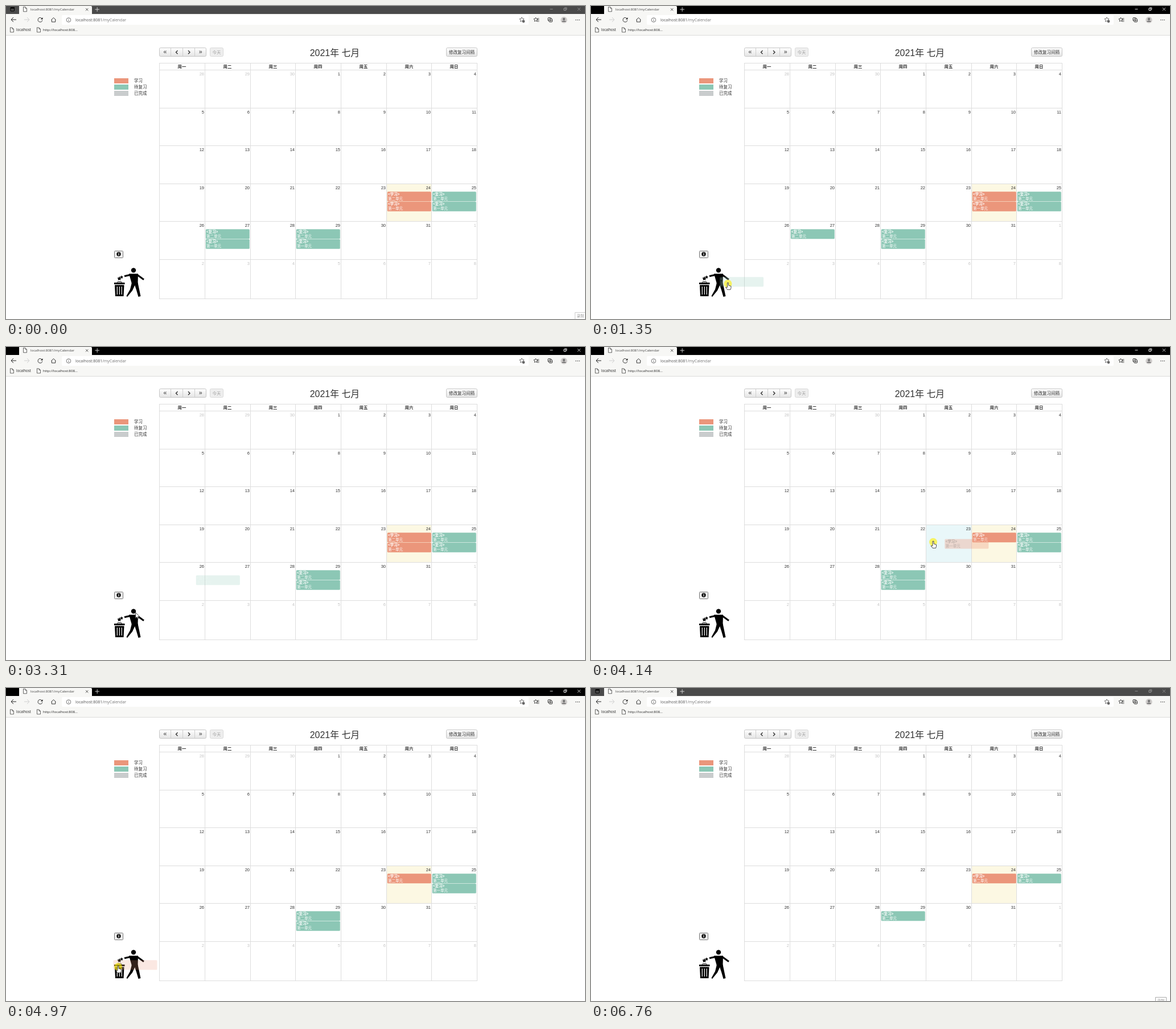
These frames come from a looping animation (1017x550 px, 6.82 s). An HTML page with a canvas:

```html
<!DOCTYPE html>
<html lang="zh-CN">
<head>
<meta charset="utf-8">
<title>Calendar</title>
<style>
html, body { margin: 0; width: 100%; height: 100%; overflow: hidden; background: #fff; }
canvas { display: block; }
</style>
</head>
<body>
<canvas id="stage" width="1017" height="550"></canvas>
<script>
const ctx = document.getElementById('stage').getContext('2d');
const LOOP = 6820;
const SANS = '"Liberation Sans", "Noto Sans CJK SC", "Noto Sans CJK JP", sans-serif';
const UI = '"Open Sans", "Noto Sans", sans-serif';
const RED = '#eb967b', GREEN = '#8cc7b5', GREY = '#c9cccd';
const DAY_ONE = 2; // index of the cell before the first of the month
const STUDY_DAY = 24;
const REVIEW_AFTER = [1, 3, 5];
const REFETCH = 5800;

const colX = i => Math.floor(269.9 + 79.62 * i);
const rowY = i => i < 6 ? Math.round(112.45 + 66.5 * i) : 514;

// Each pointer move is an eased curve: start, end, bend, destination
const ENTRY = { x: 1003, y: 541 };
const MOVES = [
  { from: 70, to: 740, bend: { x: 500, y: 470 }, dest: { x: 377, y: 418 } },
  { from: 800, to: 1496, bend: { x: 297, y: 476 }, dest: { x: 224, y: 492 } },
  { from: 1770, to: 2380, bend: { x: 300, y: 445 }, dest: { x: 368, y: 402 } },
  { from: 2380, to: 3050, bend: { x: 240, y: 494 }, dest: { x: 197, y: 492 } },
  { from: 3190, to: 3850, bend: { x: 363, y: 341 }, dest: { x: 680, y: 352 } },
  { from: 3930, to: 4980, bend: { x: 288, y: 295 }, dest: { x: 197, y: 490 } },
  { from: 5200, to: 6100, bend: { x: 300, y: 450 }, dest: { x: 934, y: 529 } }
];

const DRAGS = [
  { press: 800, drop: 1550, revert: 0, day: 27, unit: '一' },
  { press: 2380, drop: 3120, revert: 240, day: 27, unit: '二' },
  { press: 3930, drop: 5150, revert: 240, day: STUDY_DAY, unit: '一' }
];
const LIFT = 60;

function rect(x, y, w, h, fill) {
  ctx.fillStyle = fill;
  ctx.fillRect(x, y, w, h);
}

function box(x, y, w, h, r, fill, stroke) {
  ctx.beginPath();
  ctx.roundRect(x, y, w, h, r);
  if (fill) { ctx.fillStyle = fill; ctx.fill(); }
  if (stroke) { ctx.strokeStyle = stroke; ctx.lineWidth = 1; ctx.stroke(); }
}

function trace(pts) {
  ctx.beginPath();
  for (let i = 0; i < pts.length; i += 2) ctx.lineTo(pts[i], pts[i + 1]);
}

function line(color, width, ...pts) {
  trace(pts);
  ctx.strokeStyle = color;
  ctx.lineWidth = width;
  ctx.stroke();
}

function poly(fill, ...pts) {
  trace(pts);
  ctx.closePath();
  ctx.fillStyle = fill;
  ctx.fill();
}

function disc(x, y, r, fill) {
  ctx.beginPath();
  ctx.arc(x, y, r, 0, 7);
  ctx.fillStyle = fill;
  ctx.fill();
}

function ring(x, y, r, color, from = 0, to = 7) {
  ctx.beginPath();
  ctx.arc(x, y, r, from, to);
  ctx.strokeStyle = color;
  ctx.lineWidth = 0.9;
  ctx.stroke();
}

// Text centred vertically on y
function text(s, x, y, size, color, align = 'left', family = SANS, weight = '') {
  ctx.font = `${weight} ${size}px ${family}`;
  ctx.textAlign = align;
  ctx.fillStyle = color;
  ctx.fillText(s, x, y + size * 0.36);
}

function star(x, y, r, color, fill) {
  ctx.beginPath();
  for (let i = 0; i < 10; i++) {
    const a = i * Math.PI / 5 - Math.PI / 2, d = i % 2 ? r * 0.5 : r;
    ctx.lineTo(x + d * Math.cos(a), y + d * Math.sin(a));
  }
  ctx.closePath();
  ctx.strokeStyle = ctx.fillStyle = color;
  ctx.lineWidth = 0.8;
  fill ? ctx.fill() : ctx.stroke();
}

function page(x, y) {
  line('#444', 0.8, x, y, x + 3.5, y, x + 6, y + 2.5, x + 6, y + 8, x, y + 8, x, y - 0.4);
  line('#444', 0.7, x + 3.5, y, x + 3.5, y + 2.5, x + 6, y + 2.5);
}

function cross(x, y, r, color) {
  line(color, 0.8, x - r, y - r, x + r, y + r);
  line(color, 0.8, x + r, y - r, x - r, y + r);
}

function plus(x, y, r, color) {
  line(color, 0.9, x - r, y, x + r, y);
  line(color, 0.9, x, y - r, x, y + r);
}

function drawTabs(active) {
  const control = active ? '#fff' : '#999';
  rect(0, 0, 1017, 14, active ? '#000' : '#4a4a4a');
  box(8, 2.5, 6.5, 6.5, 1, null, '#000');
  rect(8, 2, 7, 2.5, '#000');
  rect(0, 14, 1017, 37, '#f7f7f5');
  box(23, 0, 128, 16, [0, 2, 0, 0], '#f7f7f5');
  page(30.5, 1.8);
  text('localhost:8081/myCalendar', 43, 6, 6.05, '#444', 'left', UI);
  cross(142.2, 6.2, 2.2, '#333');
  plus(160.2, 6, 3.8, '#ddd');
  line(control, 0.8, 955.5, 5.5, 960.5, 5.5);
  box(980, 4, 3.6, 3.6, 0, null, control);
  line(control, 0.7, 981.2, 2.8, 985, 2.8, 985, 6.5);
  cross(1006.5, 5.5, 2.5, control);
}

function drawAddressBar() {
  for (const [x, d, color] of [[9, 1, '#222'], [41, -1, '#d0d0d0']]) {
    line(color, 1, x, 24, x + 9 * d, 24);
    line(color, 1, x + 4 * d, 20, x, 24, x + 4 * d, 28);
  }
  ring(60, 24.3, 3.8, '#222', 0.2, 5.6);
  poly('#222', 64.5, 20, 64.5, 23.5, 61, 23.5);
  line('#222', 0.9, 79.5, 24.3, 83.5, 20.5, 87.5, 24.3);
  line('#222', 0.9, 80.3, 24, 80.3, 28, 86.7, 28, 86.7, 24);

  box(98, 16, 820, 17, 2, '#fff');
  ring(110, 24.5, 3.8, '#666');
  rect(109.6, 23.8, 0.9, 2.9, '#666');
  rect(109.6, 22.2, 0.9, 0.9, '#666');
  text('localhost:8081', 122, 24.3, 7, '#555', 'left', UI);
  const host = ctx.measureText('localhost:8081').width;
  text('/myCalendar', 122 + host, 24.3, 7, '#777', 'left', UI);

  star(906, 24, 4.3, '#555');
  disc(909, 27, 2.4, '#666');
  star(930.5, 24, 3.8, '#222');
  for (const y of [22, 24.5, 27]) line('#222', 0.8, 933, y, 936.5, y);
  box(952, 20.5, 5.5, 5.5, 1, null, '#333');
  box(954, 22.5, 5.5, 5.5, 1, '#f7f7f5', '#333');
  plus(956.7, 25.2, 1.8, '#333');
  disc(980, 24.5, 5.7, '#cfcccb');
  disc(980, 23, 2.2, '#777');
  ctx.beginPath();
  ctx.ellipse(980, 28, 3.6, 2.3, 0, Math.PI, 0);
  ctx.fill();
  for (const x of [1001, 1004, 1007]) disc(x, 24.5, 0.75, '#333');

  page(7.5, 38);
  page(54.5, 38);
  text('localhost', 18, 42, 6.2, '#222', 'left', UI);
  text('http://localhost:808...', 65, 42, 6.15, '#222', 'left', UI);
  rect(0, 51, 1017, 1, '#dcdcda');
}

function button(x, y, w, h) {
  const shade = ctx.createLinearGradient(0, y, 0, y + h);
  shade.addColorStop(0, '#fff');
  shade.addColorStop(1, '#e4e4e4');
  box(x + 0.5, y + 0.5, w - 1, h - 1, 2, shade, '#c6c6c6');
}

function chevron(x, d) {
  line('#333', 1.4, x + 1.5 * d, 78.3, x - 1.5 * d, 81.3, x + 1.5 * d, 84.3);
}

function drawToolbar() {
  button(269, 73, 83, 16);
  for (const x of [289, 310, 331]) rect(x, 74, 1, 14, '#cfcfcf');
  chevron(300, 1);
  chevron(321.5, -1);
  text('«', 279.5, 80.7, 10.5, '#333', 'center');
  text('»', 341.7, 80.7, 10.5, '#333', 'center');
  box(358.5, 73.5, 23, 15, 2, '#eee', '#dadada');
  text('今天', 370, 81.2, 7.4, '#a0a0a0', 'center');
  text('2021年 七月', 577.5, 82.3, 15.9, '#333', 'center');
  button(773, 73, 55, 16);
  text('修改复习间隔', 800.5, 81.2, 7.5, '#333', 'center');
}

function drawLegend() {
  [[RED, '学习'], [GREEN, '待复习'], [GREY, '已完成']].forEach(([color, label], i) => {
    const y = Math.round(127.3 + i * 10.7);
    rect(190, y, 25, 9, color);
    text(label, 225, y + 4.6, 7.5, '#333');
  });
  box(190.5, 430.5, 15, 12, 1, '#efefef', '#777');
  disc(198, 436, 3.7, '#111');
  rect(197.4, 433.6, 1.2, 1.1, '#fff');
  rect(197.4, 435.3, 1.2, 3, '#fff');
}

function drawBin() {
  disc(224, 464.4, 4.2, '#000');
  line('#000', 3, 219, 472.2, 208, 474.8);
  line('#000', 3, 230, 472, 242, 480.8);
  poly('#000', 216, 470.5, 232, 470.5, 231.5, 488, 221, 488);
  poly('#000', 221, 486, 228, 487, 222, 500, 213, 511, 211.5, 509.5, 218, 498);
  poly('#000', 225, 487, 231.5, 486, 234, 498, 236.5, 510, 232.5, 511, 229, 499);
  star(199, 479, 4, '#000', true);
  star(203, 476.5, 3.2, '#000', true);
  box(195.5, 484.5, 7.5, 3, 1, null, '#000');
  rect(190, 486, 18.5, 3, '#000');
  poly('#000', 191, 490.2, 207.5, 490.2, 206.5, 510, 192, 510);
  for (const x of [194.7, 198.7, 202.7]) rect(x, 493, 1.2, 14, '#fff');
}

function drawCard(day, unit, x, y, ink = '#fff') {
  const study = day === STUDY_DAY;
  box(x, y, 77, 17, 1.5, study ? RED : GREEN);
  text(study ? '<学习>' : '<复习>', x + 1.3, y + 4, 6.4, ink, 'left', SANS, 'bold');
  text(`第${unit}单元`, x + 1.3, y + 12, 6.5, ink);
}

function cardHome(day, unit) {
  const i = day + DAY_ONE;
  const slot = unit === '一' ? 1 : 0;
  return { x: colX(i % 7) + 1.8, y: rowY(Math.floor(i / 7)) + 14.3 + slot * 17.5 };
}

function cardGone(day, unit, t) {
  const lifted = DRAGS.some(d => d.day === day && d.unit === unit && t >= d.press + LIFT);
  return lifted || (unit === '一' && t >= REFETCH);
}

function drawCell(col, row, fill) {
  rect(colX(col), rowY(row), colX(col + 1) - colX(col), rowY(row + 1) - rowY(row), fill);
}

function drawCalendar(t, hover) {
  drawCell(5, 3, '#fcf8e3');
  if (hover) drawCell(hover.col, hover.row, '#e9f7f9');
  for (let i = 0; i < 8; i++) rect(colX(i), 100, 1, 415, '#ddd');
  rect(269, 100, 559, 1, '#ddd');
  for (let i = 0; i < 7; i++) {
    rect(269, rowY(i), 559, 1, '#ddd');
    text('周' + '一二三四五六日'[i], colX(i) + 40, 106.7, 7.4, '#333', 'center', SANS, 'bold');
  }
  for (let i = 0; i < 42; i++) {
    const day = i - DAY_ONE, inside = day > 0 && day < 32;
    const label = day < 1 ? day + 30 : day > 31 ? day - 31 : day;
    text(label, colX(i % 7 + 1) - 1, rowY(Math.floor(i / 7)) + 7.2, 7.5, inside ? '#333' : '#c4c4c4', 'right');
  }
  for (const delay of [0, ...REVIEW_AFTER]) {
    for (const unit of '二一') {
      const day = STUDY_DAY + delay, home = cardHome(day, unit);
      if (!cardGone(day, unit, t)) drawCard(day, unit, home.x, home.y);
    }
  }
}

function pointerAt(t) {
  let at = ENTRY;
  for (const { from, to, bend, dest } of MOVES) {
    if (t < from) break;
    const s = Math.min(1, (t - from) / (to - from));
    const u = s * s * (3 - 2 * s), v = 1 - u;
    const curve = k => v * v * at[k] + 2 * u * v * bend[k] + u * u * dest[k];
    at = { x: curve('x'), y: curve('y') };
  }
  return at;
}

function hoverCell(drag, t) {
  if (!drag || t < drag.press + 2 * LIFT || t >= drag.drop) return null;
  const { x, y } = pointerAt(t - 95);
  const col = Math.floor((x - 269) / 79.7), row = Math.floor((y - 112) / 66.6);
  return col < 0 || row < 0 ? null : { col, row };
}

// The dragged card trails the pointer, then glides home when released
function drawGhost(drag, t) {
  const { day, unit, press, drop, revert } = drag;
  const grab = pointerAt(press), home = cardHome(day, unit);
  const now = pointerAt(Math.max(press, Math.min(t, drop) - 50));
  const back = t > drop ? 0.5 - Math.cos(Math.PI * (t - drop) / revert) / 2 : 0;
  const outside = t > drop || pointerAt(t).x < colX(0);
  const ink = day === STUDY_DAY && !outside ? '#555' : '#fff';
  ctx.globalAlpha = outside ? 0.22 : 0.33;
  drawCard(day, unit, home.x + (now.x - grab.x) * (1 - back), home.y + (now.y - grab.y) * (1 - back), ink);
  ctx.globalAlpha = 1;
}

function drawPointer(t, pressed) {
  const { x, y } = pointerAt(t);
  const hand = pressed || DRAGS.some(d => t >= d.press - 70 && t < d.press);
  if (pressed) disc(x, y, 7, 'rgba(255, 240, 0, 0.6)');
  ctx.save();
  ctx.translate(x, y);
  if (hand) {
    poly('#fff', -1, -1.5, 1, -1.5, 1, 3, 5.5, 4.5, 5.5, 7.5, 4.5, 10.5, -1, 10.5, -4, 6.5, -1, 6.5);
  } else {
    poly('#fff', 0, 0, 0, 10, 2.4, 7.9, 4, 11.2, 5.5, 10.5, 4.1, 7.4, 7.2, 7.2);
  }
  ctx.strokeStyle = '#222';
  ctx.lineWidth = 0.8;
  ctx.stroke();
  ctx.restore();
}

function drawTip(x, y, border) {
  box(x + 0.5, y + 0.5, 19, 14, 0, '#fff', border);
  text('录制', x + 3.5, y + 7, 6.5, '#999');
}

function draw(t) {
  const drag = DRAGS.find(d => t >= d.press && t < d.drop + d.revert);
  rect(0, 0, 1017, 550, '#fff');
  drawTabs(t >= 800 && t < 6760);
  drawAddressBar();
  drawToolbar();
  drawCalendar(t, hoverCell(drag, t));
  drawLegend();
  drawBin();
  if (drag && t >= drag.press + LIFT) drawGhost(drag, t);
  if (t >= 70 && t < 6150) drawPointer(t, !!drag && t < drag.drop);
  if (t < 70) drawTip(999, 538, '#ccc');
  if (t >= 6480) drawTip(991, 543, '#aaa');
}

const start = performance.now();
function tick() {
  draw((performance.now() - start) % LOOP);
  requestAnimationFrame(tick);
}
tick();
</script>
</body>
</html>
```
